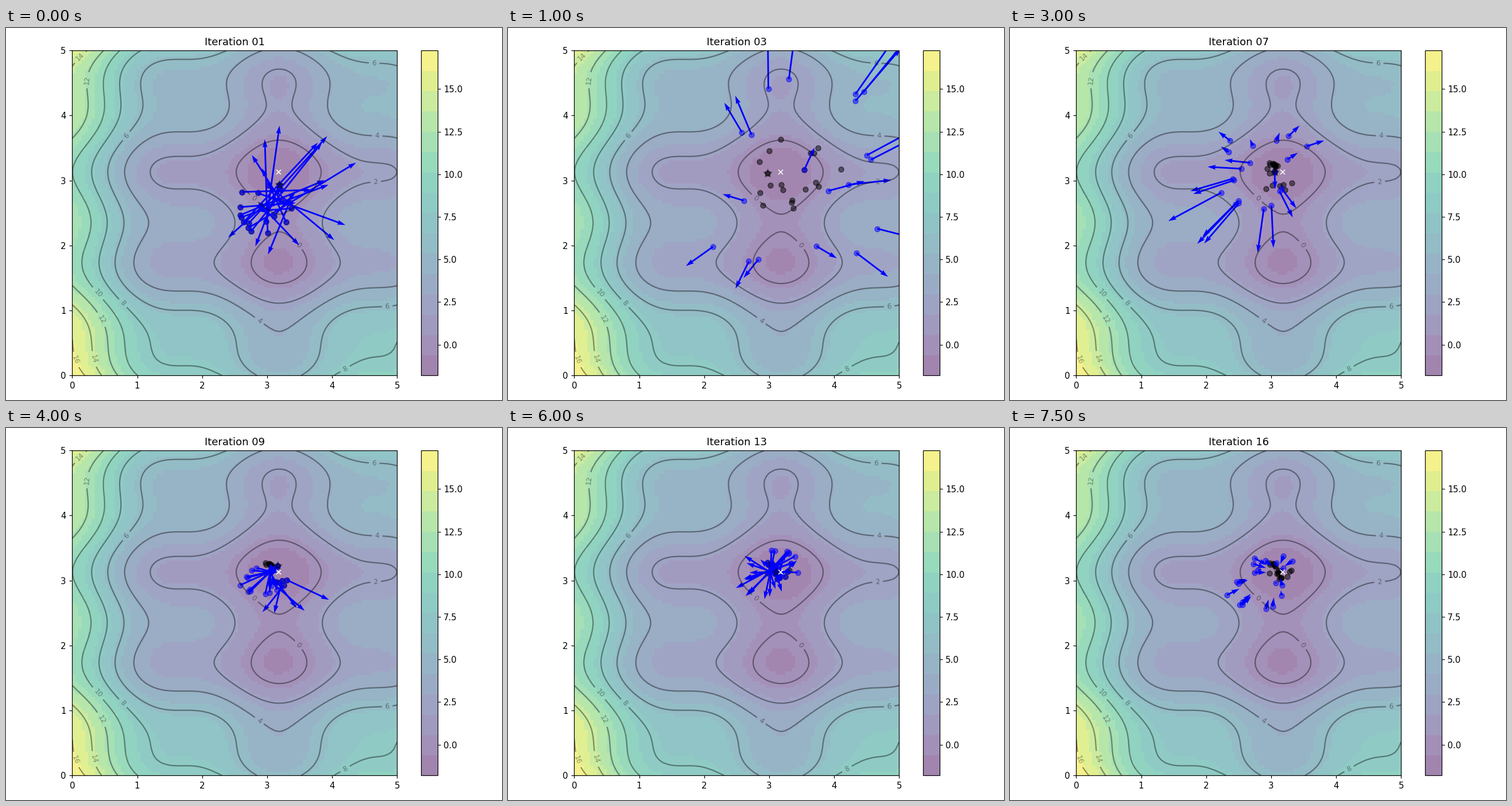
Animation of 864 by 648 pixels, one loop 8000 ms. Source, as a matplotlib script:

```python
import numpy as np
import matplotlib.pyplot as plt
from matplotlib.animation import FuncAnimation
from matplotlib.colors import ListedColormap

W, H, DPI = 864, 648, 108
FRAMES, INTERVAL = 16, 500
INERTIA, C_SELF, C_SWARM = 0.8, 0.5, 0.5
N_PARTICLES, WARMUP = 20, 2
N_BANDS = 16


def f(x, y):
    return ((x - 3.14)**2 + (y - 2.72)**2
            + np.sin(3*x + 1.41) + np.sin(4*y - 1.73))


def simulate(steps):
    """Particle swarm search; returns (X, V, pbest, gbest) after each step."""
    rng = np.random.RandomState(100)
    X = rng.rand(2, N_PARTICLES) * 5
    V = rng.randn(2, N_PARTICLES) * 0.1
    pbest, pbest_obj = X.copy(), f(*X)
    gbest = pbest[:, [pbest_obj.argmin()]]
    history = []
    for _ in range(steps):
        r1, r2 = rng.rand(2)
        V = INERTIA*V + C_SELF*r1*(pbest - X) + C_SWARM*r2*(gbest - X)
        X = X + V
        obj = f(*X)
        pbest = np.where(pbest_obj >= obj, X, pbest)
        pbest_obj = np.minimum(pbest_obj, obj)
        gbest = pbest[:, [pbest_obj.argmin()]]
        history.append((X, V, pbest, gbest))
    return history


def place(axes, left, top, width, height):
    axes.set_position([left/W, 1 - (top + height)/H, width/W, height/H])


states = simulate(FRAMES + WARMUP)[WARMUP - 1:]

x, y = np.meshgrid(np.linspace(0, 5, 100), np.linspace(0, 5, 100))
z = f(x, y)
low = z.argmin()
bands = ListedColormap(plt.get_cmap("viridis")((np.arange(N_BANDS) + 0.5) / N_BANDS))

fig, ax = plt.subplots(figsize=(W/DPI, H/DPI), dpi=DPI)
img = ax.imshow(z, extent=[0, 5, 0, 5], origin="lower", cmap=bands, alpha=0.5)
cbar = fig.colorbar(img, ax=ax, ticks=np.arange(0, 16, 2.5))
ax.plot(x.flat[low], y.flat[low], marker="x", markersize=5, color="white")
contours = ax.contour(x, y, z, 10, colors="black", alpha=0.4)
ax.clabel(contours, inline=True, fontsize=8, fmt="%.0f")

X, V, pbest, gbest = states[0]
pbest_plot = ax.scatter(*pbest, marker="o", color="black", alpha=0.5)
swarm_plot = ax.scatter(*X, marker="o", color="blue", alpha=0.5)
arrows = ax.quiver(*X, *V, color="blue", width=0.005,
                   angles="xy", scale_units="xy", scale=1)
gbest_plot = ax.scatter(*gbest, marker="*", s=100, color="black", alpha=0.4)
ax.set_xlim(0, 5)
ax.set_ylim(0, 5)

place(ax, 115.3, 39.3, 566, 566)
place(cbar.ax, 723.2, 39.3, 28.3, 566)


def animate(i):
    X, V, pbest, gbest = states[i]
    ax.set_title(f"Iteration {i + 1:02d}")
    pbest_plot.set_offsets(pbest.T)
    swarm_plot.set_offsets(X.T)
    arrows.set_offsets(X.T)
    arrows.set_UVC(*V)
    gbest_plot.set_offsets(gbest.T)
    return pbest_plot, swarm_plot, arrows, gbest_plot


anim = FuncAnimation(fig, animate, frames=FRAMES, interval=INTERVAL,
                     repeat=True, repeat_delay=0)
plt.show()
```
